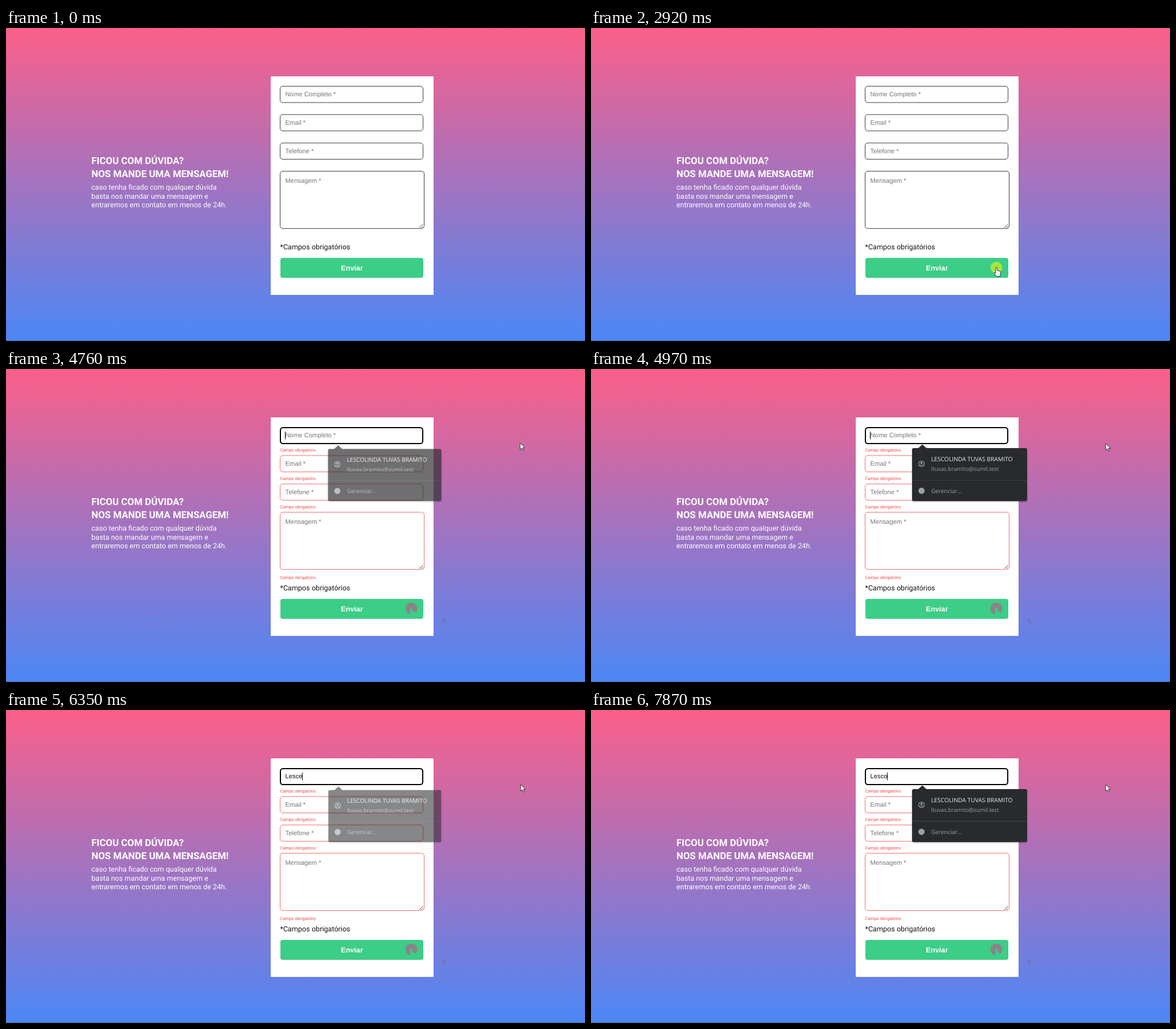
Write an HTML page that moves like this. It is 1017x550 px and loops after 8 s.

```html
<!DOCTYPE html>
<html lang="pt-BR">
<head>
<meta charset="utf-8">
<title>Formulário de contato</title>
<style>
  html, body { margin: 0; width: 100%; height: 100%; overflow: hidden; }
  svg { display: block; width: 100%; height: 100%; }
  text { text-rendering: geometricPrecision; white-space: pre; }
  .intro { fill: #fff; font: 12.6px Roboto, sans-serif; }
  .title { font-size: 16.92px; font-weight: 700; }
  .input { font: 11.25px "Liberation Sans", Arial, sans-serif; }
  .hint { fill: #757575; }
  .field { fill: #fff; stroke: #39343b; }
  .invalid .field { stroke: #f46a6a; }
  .invalid .focused { x: 482px; y: 103px; width: 250px; height: 28px; stroke: #000; stroke-width: 2; }
  .error { fill: #f04646; font: 7.56px Roboto, sans-serif; }
  .note { fill: #151515; font: 12.6px Roboto, sans-serif; }
  .send { fill: #fff; font: bold 12.7px "Liberation Sans", Arial, sans-serif; text-anchor: middle; }
  #popup { font: 10.1px "Open Sans", "Noto Sans", sans-serif; fill: #9aa0a6; }
  #popup .panel { fill: #292a2d; filter: drop-shadow(0 1px 1px #0006); }
</style>
</head>
<body>
<svg viewBox="0 0 1017 550">
  <defs>
    <linearGradient id="sky" x2="0" y2="1">
      <stop stop-color="#fb5f89"/><stop offset="1" stop-color="#4b87f6"/>
    </linearGradient>
    <path id="handShape" d="M-1.2 0q1.2-1.6 2.4 0V5l5 1.2q1.5 .5 1.3 2l-.8 4.3v3H0l-3.8-5.5q0-2 1.5-1l1.1 1z"/>
    <path id="arrowShape" d="M0 0v11.5l2.7-2.4 1.9 4.2 1.9-.9-1.9-4h3.7z"/>
  </defs>
  <rect width="1017" height="550" fill="url(#sky)"/>
  <rect y="549" width="1017" height="1" fill="#4670b4"/>

  <g class="intro">
    <text class="title" x="150" y="239">FICOU COM DÚVIDA?</text>
    <text class="title" x="150" y="261.5">NOS MANDE UMA MENSAGEM!</text>
    <text x="150" y="284">caso tenha ficado com qualquer dúvida</text>
    <text x="150" y="300">basta nos mandar uma mensagem e</text>
    <text x="150" y="315.3">entraremos em contato em menos de 24h.</text>
  </g>

  <rect x="465" y="85" width="286" height="384" fill="#fff"/>
  <g id="form"></g>
  <path d="M726 351l6.5-6.5M730 351l2.5-2.5" stroke="#444" fill="none"/>
  <text id="typed" class="input" x="490.5" y="120" fill="#111"></text>
  <rect id="caret" y="110" width="1" height="13.5" fill="#000"/>
  <text class="note" x="481.5" y="388.5">*Campos obrigatórios</text>
  <rect x="482" y="404" width="251" height="35" rx="4" fill="#3ccd87"/>
  <text class="send" x="607.7" y="426">Enviar</text>
  <g id="stain">
    <circle cx="712" cy="421" r="10.5" fill="#8a8488"/>
    <use href="#handShape" x="712" y="421" fill="#3ccd87" stroke="#3ccd87"/>
  </g>
  <use id="trace" href="#arrowShape" x="767" y="436" fill="#667" opacity=".3"/>

  <g id="popup">
    <path class="panel" d="M567 139h8l7-6.500 7 6.500h174q3 0 3 3v87q0 3-3 3h-196q-3 0-3-3v-87q0-3 3-3z"/>
    <path d="M564 195.5h202" stroke="#3f4144"/>
    <g fill="none" stroke="#9aa0a6" stroke-width="1.2">
      <circle cx="580.5" cy="166.5" r="5"/>
      <path d="M577 170q3.5-3 7 0"/>
    </g>
    <circle cx="580.5" cy="165" r="1.9"/>
    <circle cx="580.5" cy="214" r="5.5"/>
    <text x="597.5" y="162" font-size="10.35" fill="#e8eaed">LESCOLINDA TUVAS BRAMITO</text>
    <text x="597.5" y="179" font-size="9.8">ltuvas.bramito@zumil.test</text>
    <text x="597.5" y="218">Gerenciar...</text>
  </g>

  <circle id="click" r="10.3" fill="#ff0" fill-opacity=".52"/>
  <g fill="#fff" stroke="#222" stroke-width=".9" stroke-linejoin="round">
    <use id="arrow" href="#arrowShape"/>
    <use id="hand" href="#handShape"/>
    <path id="beam" d="M-2.5-5.5h2l.5 .5 .5-.5h2M0-5V5M-2.5 5.5h2l.5-.5 .5 .5h2" fill="none" stroke="#666"/>
  </g>
</svg>
<script>
const LOOP = 8000;
const $ = id => document.getElementById(id);
const show = (id, on) => $(id).style.display = on ? '' : 'none';
const between = (t, a, b) => t >= a && t < b;
const ramp = (t, a, b) => Math.min(1, Math.max(0, (t - a) / (b - a)));

// label, top, width, height, text baseline, error baseline
const fields = [
  ['Nome Completo *', 102.3, 251, 28.7, 120, 144.5],
  ['Email *', 152.1, 251, 28.7, 170, 194.5],
  ['Telefone *', 202, 251, 28.7, 220, 244.5],
  ['Mensagem *', 251.7, 253, 100.6, 272, 369]
];
$('form').innerHTML = fields.map(([label, y, w, h, base, errorY]) => `
  <rect class="field" x="481.5" y="${y}" width="${w}" height="${h}" rx="4.5"/>
  <text class="input hint" x="490.5" y="${base}">${label}</text>
  <text class="error" x="481.5" y="${errorY}">Campo obrigatório</text>`).join('');
const nameField = document.querySelector('.field');
const nameHint = document.querySelector('.hint');
const errors = document.querySelectorAll('.error');

// time, x, y of the pointer tip
const path = [
  [190, 870, 533], [330, 815, 487], [530, 740, 437], [730, 711, 420],
  [900, 711, 420], [930, 712, 421], [3160, 712, 421],
  [3300, 768, 435], [3420, 850, 424], [3520, 886, 380], [3680, 846, 272],
  [3830, 768, 168], [3960, 725, 124], [4030, 723, 117], [4350, 723, 116],
  [4480, 770, 118], [4620, 862, 126], [4760, 903, 130], [4960, 904, 131]
];
const typing = [[5690, 'L'], [5820, 'Le'], [5960, 'Les'], [6080, 'Lesc'],
                [6280, 'Lesce'], [7280, 'Lesc'], [7870, 'Lesco']];

function pointerAt(t) {
  const next = path.findIndex(p => p[0] > t);
  if (next < 0) return path[path.length - 1].slice(1);
  const [t0, x0, y0] = path[next - 1], [t1, x1, y1] = path[next];
  const k = ramp(t, t0, t1);
  return [x0 + (x1 - x0) * k, y0 + (y1 - y0) * k];
}

function drawPointer(t) {
  let kind = '';
  if (t >= path[0][0]) {
    const [x, y] = pointerAt(t);
    const inside = x < 733;
    kind = inside && y > 404 && y < 440 ? 'hand' : inside && y < 132 ? 'beam' : 'arrow';
    $(kind).setAttribute('transform', `translate(${x} ${y})`);
  }
  for (const id of ['arrow', 'hand', 'beam']) show(id, id === kind);

  const onButton = between(t, 2920, 3010);
  show('click', onButton || between(t, 4160, 4350));
  $('click').setAttribute('transform', onButton ? 'translate(712 421)' : 'translate(721.5 116)');
  show('stain', t >= 3010);
  show('trace', t >= 3300);
}

function drawForm(t) {
  const invalid = t >= 3010, focused = t >= 4100;
  $('form').classList.toggle('invalid', invalid);
  nameField.classList.toggle('focused', focused);
  errors.forEach(e => e.style.display = invalid ? '' : 'none');

  const value = typing.reduce((last, [at, text]) => t >= at ? text : last, '');
  $('typed').textContent = value;
  nameHint.style.display = value ? 'none' : '';
  $('caret').setAttribute('x', 490 + (value ? $('typed').getComputedTextLength() : 0));
  show('caret', focused && !between(t, 5360, 5690) && !between(t, 6810, 7280));
}

function drawPopup(t) {
  const open = t < 6280 ? ramp(t, 4580, 4850) : t < 7000 ? 1 - ramp(t, 6250, 6480) : ramp(t, 7230, 7340);
  const scale = 0.955 + 0.045 * open;
  show('popup', open > 0);
  $('popup').setAttribute('opacity', open);
  $('popup').setAttribute('transform', `translate(680 232) scale(${scale}) translate(-680 -232)`);
}

const start = performance.now();
function frame() {
  const t = (performance.now() - start) % LOOP;
  drawForm(t);
  drawPopup(t);
  drawPointer(t);
  requestAnimationFrame(frame);
}
frame();
</script>
</body>
</html>
```
